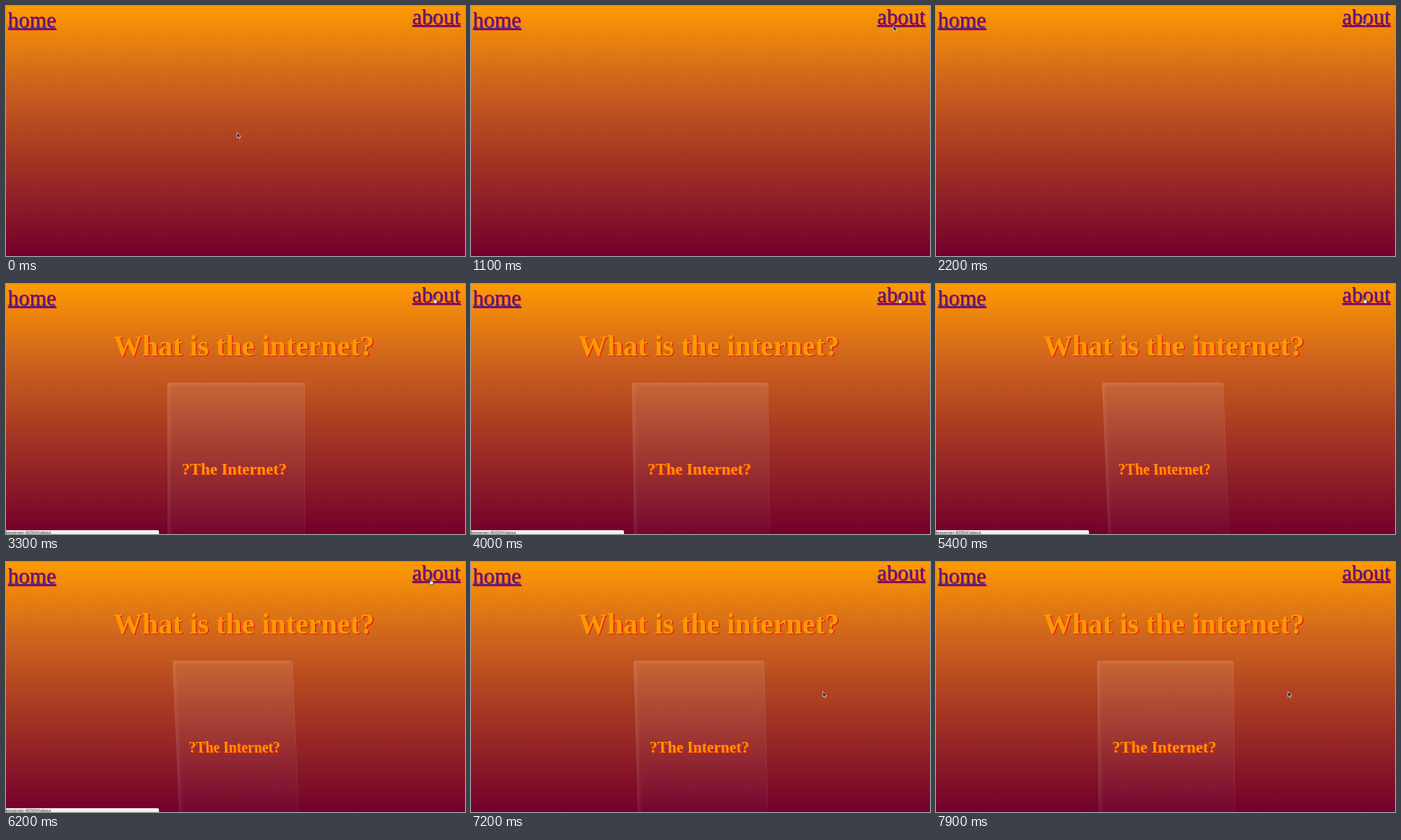
Recreate the animation shown at these times as an HTML page. Size 600 px wide and 328 px high, loop 8000 ms.

```html
<!DOCTYPE html>
<html lang="en">
<head>
<meta charset="utf-8">
<title>What is the internet?</title>
<style>
  html, body { margin: 0; width: 100%; height: 100%; overflow: hidden; }

  .stage {
    --loop: 8s infinite;
    position: relative;
    width: 600px;
    height: 328px;
    overflow: hidden;
    background: linear-gradient(#fe9a02, #cf641d 30%, #a53723 60%, #72002c);
    font-family: "Liberation Serif", "Times New Roman", serif;
    line-height: 1;
    white-space: nowrap;
  }
  .stage * { position: absolute; }

  .link {
    font-size: 28.4px;
    color: #4f1a7c;
    text-decoration: underline 2px;
    text-underline-offset: 1px;
    text-shadow: 1px 1px 0 #d0143c;
  }
  .home { left: 2.3px; top: 4.5px; }
  .about { left: 530.8px; top: 1px; }

  .page { inset: 0; animation: page var(--loop) step-end; }
  .page h1, .page h2 {
    margin: 0;
    color: #ff9800;
    text-shadow: 1.4px 1.4px 0 #e81c14;
  }
  h1 { left: 140.2px; top: 63.4px; font-size: 37.8px; }
  h2 { left: 18.8px; top: 103.6px; font-size: 21.4px; }

  .card {
    left: 211px;
    top: 129px;
    width: 180px;
    height: 229px;
    border-radius: 3px;
    outline: 1px solid transparent;
    background: linear-gradient(rgba(255, 255, 255, .1), rgba(255, 255, 255, .01));
    box-shadow: inset 3px 2px 5px rgba(255, 255, 255, .1),
                inset -1px 0 2px rgba(255, 255, 255, .06);
    animation: swing var(--loop);
  }

  .status {
    left: 0;
    top: 323px;
    width: 200px;
    height: 12px;
    border-radius: 0 2px 0 0;
    background: #f5f0ee;
    overflow: hidden;
    animation: status var(--loop) step-end;
  }
  .status span {
    left: -2px;
    top: 1px;
    font: 5.8px/1 "Liberation Sans", Arial, sans-serif;
    color: #333;
  }

  .cursor { left: 0; top: 0; width: 10px; height: 12px; overflow: visible; animation: travel var(--loop); }
  .arrow { animation: arrow var(--loop) step-end; }
  .hand { animation: hand var(--loop) step-end; }

  @keyframes page { 0% { opacity: 0; } 36.25%, 100% { opacity: 1; } }
  @keyframes status { 0% { opacity: 0; } 36.25% { opacity: 1; } 83.75%, 100% { opacity: 0; } }
  @keyframes arrow { 0% { opacity: 1; } 35% { opacity: 0; } 80%, 100% { opacity: 1; } }
  @keyframes hand { 0% { opacity: 0; } 35% { opacity: 1; } 80%, 100% { opacity: 0; } }

  /* 3 s each way; the return is cut at 70 % of its ease-in-out curve */
  @keyframes swing {
    0%, 36.25% { transform: rotateY(0deg) rotateX(5deg); animation-timing-function: ease-in-out; }
    73.75% { transform: rotateY(30deg) rotateX(5deg); animation-timing-function: cubic-bezier(.434, 0, .674, .644); }
    100% { transform: rotateY(5.62deg) rotateX(5deg); }
  }

  @keyframes travel {
    0%, 2% { transform: translate(302px, 166px); animation-timing-function: ease-in-out; }
    11.25% { transform: translate(549px, 30px); animation-timing-function: ease-out; }
    22.5%, 75% { transform: translate(558px, 17.5px); animation-timing-function: ease-in; }
    77.5% { transform: translate(553px, 22px); animation-timing-function: ease-in-out; }
    87.5%, 100% { transform: translate(460px, 170px); }
  }
</style>
</head>
<body>
<div class="stage">
  <a class="link home">home</a>
  <a class="link about">about</a>

  <div class="page">
    <h1>What is the internet?</h1>
    <div class="card"><h2>?The Internet?</h2></div>
  </div>

  <div class="status"><span>devserver:4000/#/about</span></div>

  <svg class="cursor" viewBox="0 0 10 12">
    <path class="arrow" d="M0 0V7L1.6 5.6L2.7 8.2L4 7.6L2.9 5.2H5Z"
          fill="#111" stroke="#eee" stroke-width=".7"/>
    <path class="hand" d="M1.2 .6Q2 0 2.4 .9V3L5 3.5Q5.8 3.8 5.6 5L5 8H2L0 5.2Q.2 4.2 1.2 5Z"
          fill="#fff" stroke="#222" stroke-width=".7"/>
  </svg>
</div>
</body>
</html>
```
